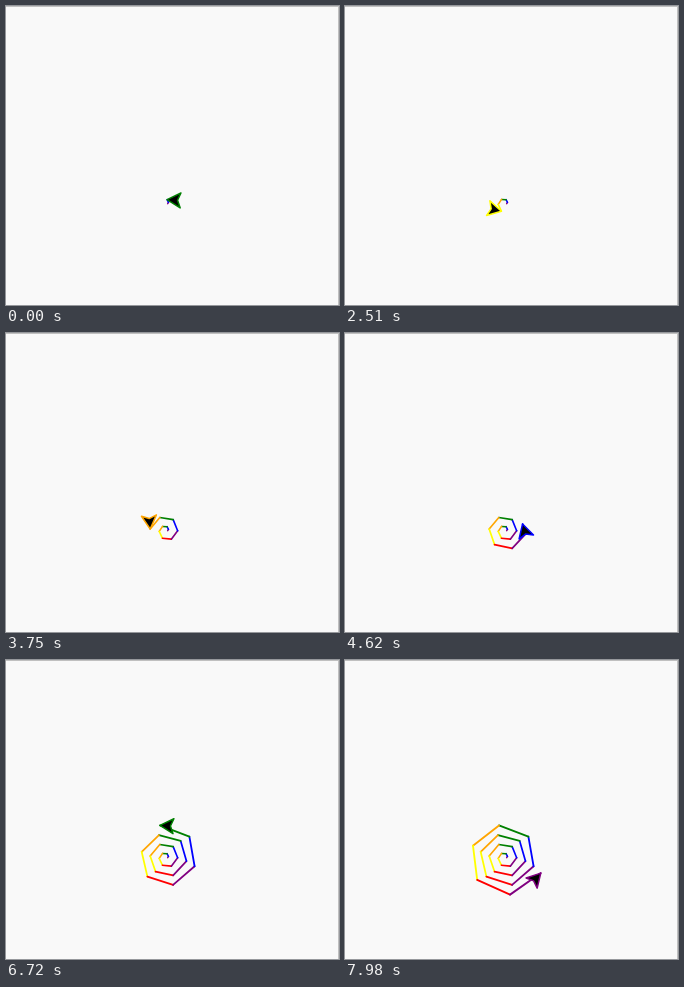
Recreate the animation shown at these times as an HTML page with a canvas. Size 333x299 px, loop 8 s.

```html
<!DOCTYPE html>
<html lang="en">
<head>
<meta charset="utf-8">
<title>Turtle spiral</title>
<style>
  html, body { margin: 0; width: 100%; height: 100%; overflow: hidden; background: #f9f9f9; }
  canvas { display: block; }
</style>
</head>
<body>
<canvas width="333" height="299"></canvas>
<script>
const ctx = document.querySelector('canvas').getContext('2d');
const LOOP = 8000;
const HOLD = 970;
const FRAME = 77.9;
const START = 935;
const TURN_TIME = 204;
const MOVE_TIMES = [50, 84, 140];
const ANGLE = 59;
const SCALE = 1.5;
const ORIGIN = { x: 161.7, y: 197.6 };
const COLORS = ['red', 'purple', 'blue', 'green', 'orange', 'yellow'];
const ARROW = [[0, 0], [-9, -5], [-7, 0], [-9, 5]];
const radians = degrees => degrees * Math.PI / 180;

// The opening pose is held, then the spiral restarts and advances in camera ticks.
function sampleTime(t) {
  if (t < HOLD) return START + 3 * (MOVE_TIMES[0] + TURN_TIME) + 10;
  return 955 + Math.floor((t - 955) / FRAME) * FRAME;
}

function drawArrow(x, y, heading, color) {
  ctx.save();
  ctx.translate(x, y);
  ctx.rotate(-radians(heading));
  ctx.scale(SCALE, SCALE);
  ctx.beginPath();
  ARROW.forEach(point => ctx.lineTo(...point));
  ctx.closePath();
  ctx.fillStyle = 'black';
  ctx.fill();
  ctx.lineWidth = 1;
  ctx.strokeStyle = color;
  ctx.stroke();
  ctx.restore();
}

function draw(t) {
  ctx.fillStyle = '#f9f9f9';
  ctx.fillRect(0, 0, 333, 299);
  ctx.fillStyle = '#c0c0c0';
  ctx.fillRect(0, 0, 333, 1);
  ctx.fillRect(332, 0, 1, 299);
  ctx.lineCap = ctx.lineJoin = 'round';

  let left = sampleTime(t) - START;
  let { x, y } = ORIGIN;
  for (let step = 0; ; step++) {
    const color = COLORS[step % COLORS.length];
    const heading = step * ANGLE;
    const hops = 1 + Math.floor(step / 12);
    const moveTime = MOVE_TIMES[hops - 1];
    // Moves happen in whole hops of at most 12 units.
    const moved = Math.floor(Math.min(1, left / moveTime) * hops) / hops;
    const length = step * SCALE * moved;
    const endX = x + length * Math.cos(radians(heading));
    const endY = y - length * Math.sin(radians(heading));
    if (length > 0) {
      ctx.beginPath();
      ctx.moveTo(x, y);
      ctx.lineTo(endX, endY);
      ctx.strokeStyle = color;
      ctx.lineWidth = SCALE * (1 + step / 100);
      ctx.stroke();
    }
    x = endX;
    y = endY;
    left -= moveTime;
    if (left < TURN_TIME) {
      drawArrow(x, y, heading + ANGLE * Math.max(0, left) / TURN_TIME, color);
      return;
    }
    left -= TURN_TIME;
  }
}

const begin = performance.now();
function tick() {
  draw((performance.now() - begin) % LOOP);
  requestAnimationFrame(tick);
}
tick();
</script>
</body>
</html>
```
